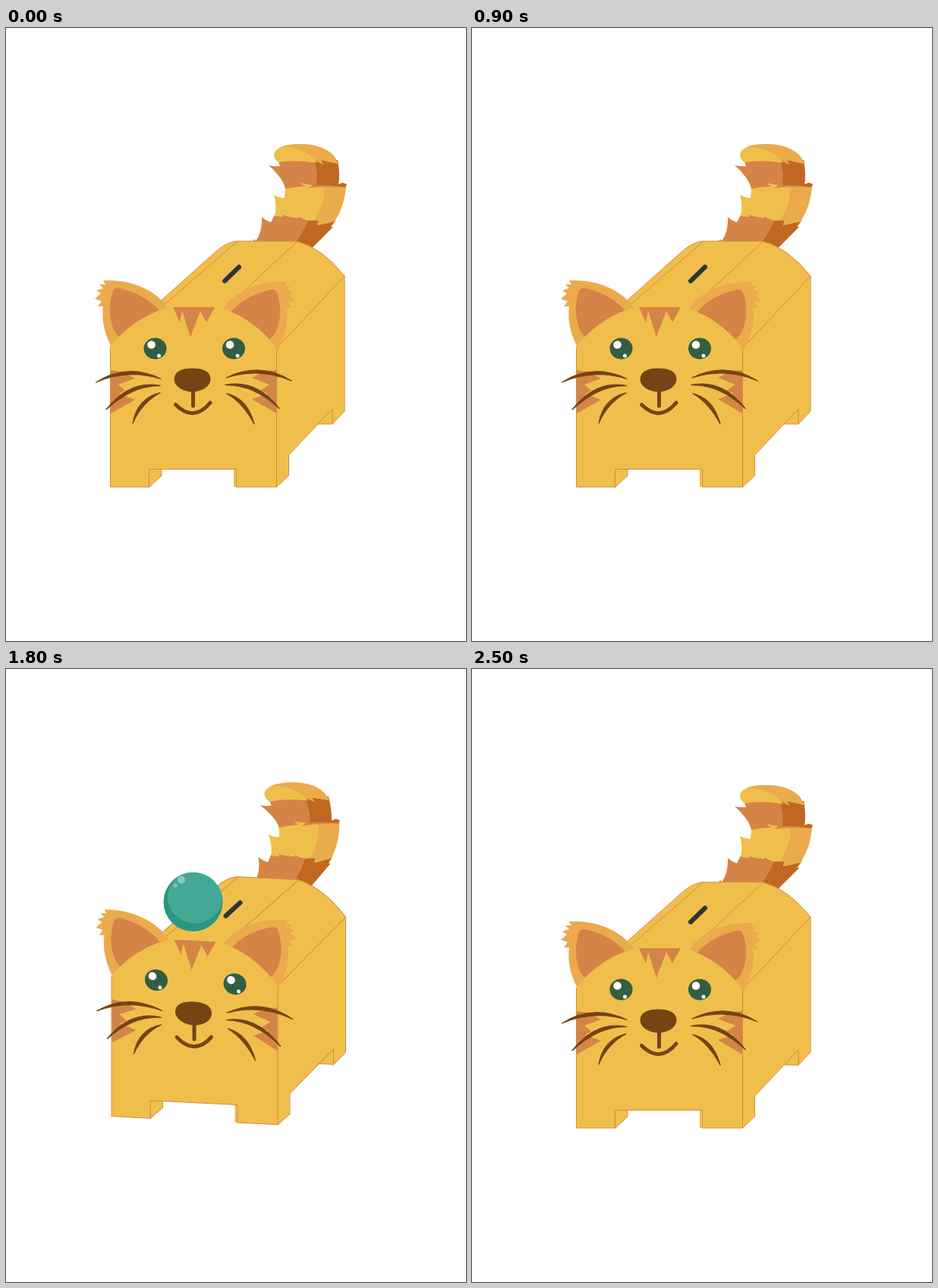
These frames come from a looping animation (606x808 px, 2600 ms). An HTML page with a canvas:

```html
<!DOCTYPE html>
<html lang="en">
<head>
<meta charset="utf-8">
<title>Cat box</title>
<style>
html, body { margin: 0; width: 100%; height: 100%; overflow: hidden; background: #fff; }
canvas { display: block; }
</style>
</head>
<body>
<canvas id="stage" width="606" height="808"></canvas>
<script>
const ctx = document.getElementById('stage').getContext('2d');
const LOOP = 2600, STEP = 100;
const C = {
  fur: '#f0bf4b', line: '#d48a48', amber: '#ebaa4c', rust: '#d48446', dark: '#c06822',
  brown: '#754412', eye: '#335e41', slot: '#2f3437',
  ball: '#2b9681', ballLight: '#43a995', shine: '#83cabd'
};

// Keyframes: [time, value] pairs, linear between them
const blinkKeys = [[0, 0], [100, .45], [200, 1], [300, .4], [400, 0], [1000, 0], [1100, .45], [1200, 1], [1300, .4], [1400, 0]];
const earKeys = [[0, 0], [100, .12], [200, .24], [400, .1], [600, 0], [1000, 0], [1100, .12], [1200, .24], [1300, .12], [1400, 0]];
const tailKeys = [[1200, 0], [1300, .16], [1400, .33], [1500, .25], [1600, .13], [1800, -.1], [2000, -.2], [2200, -.2], [2400, -.06], [2500, 0]];
const skewKeys = [[1700, 0], [1800, .05], [1900, .11], [2000, .123], [2100, .08], [2200, .032], [2300, 0]];
const shiftKeys = [[1700, 0], [1900, 3], [2200, 3], [2500, 0]];
const ballKeys = [[1300, -40], [1400, 38], [1600, 182.5], [1700, 250], [1800, 307], [1900, 318], [2000, 266.5], [2200, 116.5], [2300, 42], [2400, -40]];

function at(keys, t) {
  if (t <= keys[0][0]) return keys[0][1];
  for (let i = 1; i < keys.length; i++) {
    const [a, va] = keys[i - 1], [b, vb] = keys[i];
    if (t <= b) return va + (vb - va) * (t - a) / (b - a);
  }
  return keys[keys.length - 1][1];
}

function fill(path, color) {
  ctx.fillStyle = color;
  ctx.fill(new Path2D(path));
}

function stroke(path, color, width) {
  ctx.strokeStyle = color;
  ctx.lineWidth = width;
  ctx.stroke(new Path2D(path));
}

function oval(x, y, rx, ry, color) {
  ctx.fillStyle = color;
  ctx.beginPath();
  ctx.ellipse(x, y, rx, ry, 0, 0, Math.PI * 2);
  ctx.fill();
}

function turn(x, y, angle) {
  ctx.translate(x, y);
  ctx.rotate(angle);
  ctx.translate(-x, -y);
}

function drawTail(angle) {
  ctx.save();
  turn(382, 310, angle);
  // lower band
  fill('M322 287 L327 278 L329 281 Q338 268 337 249 Q342 254 349 256 L354 246 L365 249 L363 246 Q374 249 385 250 L382 247 L398 254 L412 253 L410 259 L434 254 L428 262 L431 262 L404 289 L398 300 H330Z', C.rust);
  fill('M398 253 L412 253 L410 259 L434 254 L428 262 L431 262 L404 289 L398 300 H366 Q391 275 398 253Z', C.dark);
  // middle band
  fill('M354 248 Q357 234 353 220 Q360 224 367 224 L368 211 L394 205 L448 207 Q447 232 433 255 L410 260 L412 253 L398 254 L382 247 L385 251 L363 246 L365 249Z', C.fur);
  fill('M419 206 L448 207 Q447 232 433 255 L410 260 L412 254 L405 254 Q422 230 419 206Z', C.amber);
  // upper band
  fill('M368 212 Q365 198 346 181 Q354 183 361 182 L358 174 H437 Q440 192 438 206 L444 204 L449 206 L447 210 Q418 208 398 211 L404 207 L389 205 L394 209 Q380 209 368 212Z', C.rust);
  fill('M405 174 H437 Q440 192 438 206 L444 204 L449 206 L447 210 Q424 206 409 207 Q412 189 405 174Z', C.dark);
  // tip
  fill('M353 168 C353 157 370 153 387 153 C415 153 434 164 437 179 L415 174 L418 180 L407 174 L410 178 Q383 173 359 177 Q354 174 353 168Z', C.fur);
  fill('M361 157 Q372 153 387 153 C415 153 434 164 437 179 L415 174 L418 180 L407 174 Q390 156 361 157Z', C.amber);
  ctx.restore();
}

function drawBody() {
  const shell = 'M180 381 L275 296 Q289 283 303 281 H383 Q417 290 446 327 V505 L430 522 H411 L372 563 V590 L356.5 605 H300 V400Z';
  fill(shell, C.fur);
  stroke('M180 381 L275 296 Q289 283 303 281 H383 Q417 290 446 327 V505 L430 522 H411 L372.5 563 V590 L356.5 605', C.line, 1);
  stroke('M207 366 L304 282 M286 372 L383 282 M356.5 422 L446 327 M430 522 V502 L411 522', C.line, 1);
  stroke('M288 333.5 L307 315', C.slot, 6);
}

function drawEar(angle) {
  ctx.save();
  turn(138, 418, angle);
  fill('M138 419 C128 398 126 382 128 367 L121 367 L126 360 L117 357 L125 350 L119 346 L128 343 L123 338 L131 338 L128 333 C158 331 188 341 206 360 L226 385 L150 425Z', C.amber);
  fill('M149 407 C135 395 134 362 142 345 Q146 341 153 344 Q185 352 203 374 L190 400 L160 415Z', C.rust);
  ctx.restore();
}

function drawEars(angle) {
  drawEar(angle);
  ctx.save();
  ctx.translate(498, 2);
  ctx.scale(-1, 1);
  drawEar(angle);
  ctx.restore();
}

function drawEye(x, blink) {
  oval(x, 422.5 + blink * .5, 15, 14 * (1 - blink), C.eye);
  if (blink > .9) {
    stroke(`M${x - 12.5} 423 H${x + 12.5}`, C.eye, 5);
    return;
  }
  const open = 1 - blink;
  oval(x - 5, 422.5 - 5 * open, 5.3, 5.3 * open, '#fff');
  oval(x + 5, 422.5 + 9.5 * open, 2.5, 2.5 * open, '#fff');
}

// Tapered hair: two arcs sharing their ends
function whisker(x0, y0, cx, cy, x1, y1) {
  const len = Math.hypot(x1 - x0, y1 - y0);
  const nx = -(y1 - y0) / len * 4, ny = (x1 - x0) / len * 4;
  const d = `M${x0} ${y0} Q${cx + nx} ${cy + ny} ${x1} ${y1} Q${cx - nx} ${cy - ny} ${x0} ${y0}Z`;
  fill(d, C.brown);
  stroke(d, C.brown, 1.3);
}

function drawFace(blink) {
  fill('M137.5 420 C165 385 205 364 247 364 C289 364 329 385 356.5 422 V605 H303.5 V581.5 H205 V590 L189 605 H137.5Z', C.fur);
  stroke('M137.5 420 V605 H189 L205 590 V581.5 M188.5 605 V581.5 H303.5 V605 H356.5 V422', C.line, 1);
  fill('M220 368 H275 L264 388 L256 373 L243 407 L232 373 L229 388Z', C.rust);
  fill('M138 451 L152 453 L170 462 L148 470 L157 478 L149 482 L170 490 L138 508Z', C.rust);
  fill('M356 451 L342 452 L324 461 L347 470 L335 478 L345 482 L324 489 L356 508Z', C.rust);
  drawEye(196.5, blink);
  drawEye(300, blink);
  fill('M221.5 463 C221.5 453 231 448.5 245.5 448.5 C260 448.5 269.5 453 269.5 463 C269.5 472 258 479.5 245.5 479.5 C233 479.5 221.5 472 221.5 463Z', C.brown);
  stroke('M246.5 477 V498', C.brown, 5);
  stroke('M223.5 496.5 Q247 520 269 494', C.brown, 5);
  whisker(204, 462.5, 160, 445, 118.5, 467);
  whisker(203, 471.5, 165, 467, 132, 503);
  whisker(203, 481, 176, 491, 167, 521);
  whisker(290, 461, 334, 443, 376, 465);
  whisker(289, 470.5, 328, 466, 360, 501.5);
  whisker(291, 482, 315, 491, 327, 522);
}

function drawBall(y) {
  ctx.save();
  ctx.translate(246.5, y);
  oval(0, 0, 39, 39, C.ball);
  ctx.clip();
  oval(2.5, -6, 36, 34, C.ballLight);
  oval(-15.5, -29, 5, 5, C.shine);
  oval(-23.5, -21.5, 2.4, 2.4, C.shine);
  ctx.restore();
}

function draw(t) {
  ctx.setTransform(1, 0, 0, 1, 0, 0);
  ctx.fillStyle = '#fff';
  ctx.fillRect(0, 0, 606, 808);
  ctx.lineCap = 'round';
  ctx.lineJoin = 'round';

  // The front lifts while the back edge stays put
  const skew = at(skewKeys, t);
  ctx.save();
  ctx.transform(1, skew, 0, 1, at(shiftKeys, t), -446 * skew);
  drawTail(at(tailKeys, t));
  drawBody();
  drawEars(at(earKeys, t));
  drawFace(at(blinkKeys, t));
  ctx.restore();

  const y = at(ballKeys, t);
  if (y > -40) drawBall(y);
}

function tick() {
  const t = performance.now() % LOOP;
  draw(Math.floor(t / STEP) * STEP);
  requestAnimationFrame(tick);
}
tick();
</script>
</body>
</html>
```
